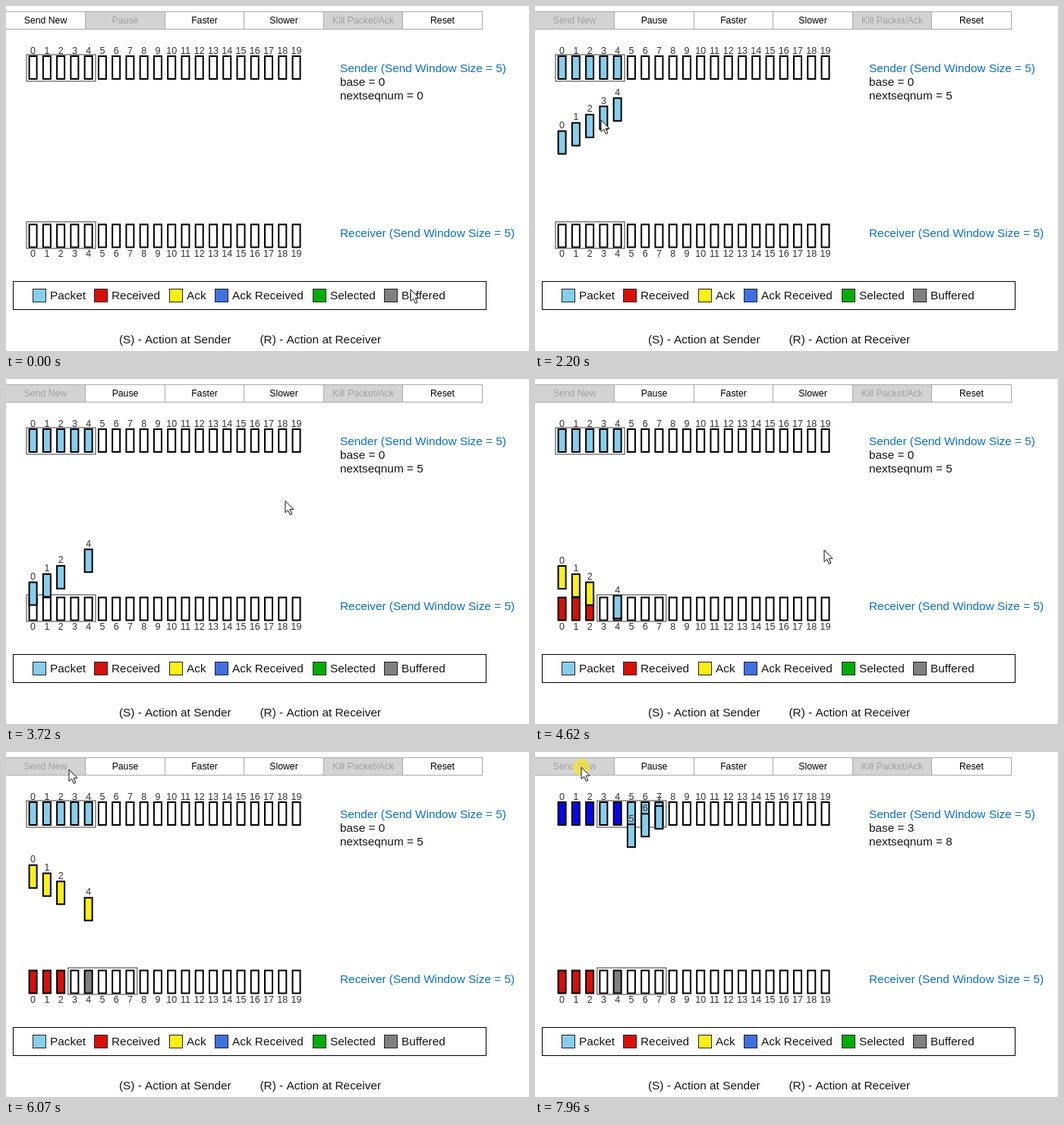
Recreate the animation shown at these times as an HTML page with a canvas. Size 689 by 454 pixels, loop 8 s.

```html
<!DOCTYPE html>
<html lang="en">
<head>
<meta charset="utf-8">
<title>Selective repeat protocol</title>
<style>
  html, body { margin: 0; width: 100%; height: 100%; overflow: hidden; background: #fff; }
  canvas { display: block; }
</style>
</head>
<body>
<canvas id="stage" width="689" height="454"></canvas>
<script>
const ctx = document.getElementById('stage').getContext('2d');
const LOOP = 8000;
const SLOTS = 20, PITCH = 18.26, SENDER_Y = 66, RECEIVER_Y = 287;
const TRAVEL = RECEIVER_Y - SENDER_Y;
const DOWN_SPEED = 0.0677, UP_SPEED = 0.067; // px per ms
const COLOR = {
  packet: '#87ceeb', received: '#d90f08', ack: '#faf014', ackReceived: '#4070e0',
  selected: '#00ad08', buffered: '#808080', acked: '#0606f0', title: '#0a70c4'
};

// Packet 3 is selected and then killed on its way down.
const SELECT_AT = 2300, KILL_AT = 3160, LOST = 3;
const packets = [745, 905, 1065, 1225, 1385, 7530, 7735, 7886].map((sent, id) => {
  const arrives = id === LOST ? Infinity : sent + TRAVEL / DOWN_SPEED;
  return { id, sent, arrives, acked: arrives + TRAVEL / UP_SPEED };
});
const clicks = [...packets.map(p => p.sent), SELECT_AT, KILL_AT];

// Pointer stops: time, x, y
const pointerPath = [
  [40, 533, 373], [430, 59, 18], [1440, 59, 18], [1560, 60, 131], [2200, 87, 150],
  [2340, 87, 152], [2780, 496, 28], [2900, 496, 28], [3100, 490, 19], [3260, 490, 19],
  [3880, 344, 188], [4250, 394, 243], [4560, 381, 225], [4660, 381, 225],
  [5050, 476, 358], [5520, 85, 27], [6000, 83, 23], [6150, 83, 23], [6400, 175, 32],
  [6850, 250, 24], [7200, 250, 24], [7480, 60, 20], [8000, 61, 20]
];

function pointerAt(t) {
  const next = pointerPath.findIndex(stop => stop[0] > t);
  if (next < 1) return pointerPath[0].slice(1);
  const [t0, x0, y0] = pointerPath[next - 1], [t1, x1, y1] = pointerPath[next];
  const u = (t - t0) / (t1 - t0), eased = u * u * (3 - 2 * u);
  return [x0 + (x1 - x0) * eased, y0 + (y1 - y0) * eased];
}

function text(str, x, y, size = 15.36, color = '#151515', align = 'left') {
  ctx.font = `${size}px "Liberation Sans", Arial, sans-serif`;
  ctx.textAlign = align;
  ctx.fillStyle = color;
  ctx.fillText(str, x, y);
}

function box(x, y, w, h, fill, stroke, lineWidth) {
  if (fill) {
    ctx.fillStyle = fill;
    ctx.fillRect(x, y, w, h);
  }
  ctx.strokeStyle = stroke;
  ctx.lineWidth = lineWidth;
  ctx.strokeRect(x, y, w, h);
}

const slotX = id => 35.6 + id * PITCH;
const label = (id, y) => text(id, slotX(id), y, 12.5, '#333', 'center');
const cell = (id, y, fill) => box(slotX(id) - 5, y, 10, 30, fill, '#000', 2);

function movingCell(id, y, fill) {
  cell(id, y, fill);
  label(id, y - 3.5);
}

function drawButtons(t, base, nextSeq) {
  const killable = t >= SELECT_AT && t < KILL_AT;
  const buttons = [
    ['Send New', nextSeq < base + 5], ['Pause', nextSeq > 0], ['Faster', true],
    ['Slower', true], ['Kill Packet/Ack', killable], ['Reset', true]
  ];
  buttons.forEach(([name, enabled], i) => {
    const left = Math.round(i * 104.6 - 0.6) + 0.5, right = Math.round((i + 1) * 104.6 - 0.6) + 0.5;
    box(left, 7.5, right - left, 23, enabled ? '#fff' : '#d3d3d3', '#aaa', 1);
    text(name, (left + right) / 2, 23, 12.25, enabled ? '#000' : '#a0a0a0', 'center');
  });
}

function drawLegend() {
  box(9.5, 362.5, 623, 37, null, '#000', 1);
  [
    [35, 'Packet', 'packet'], [116, 'Received', 'received'], [215, 'Ack', 'ack'],
    [275, 'Ack Received', 'ackReceived'], [404, 'Selected', 'selected'], [498, 'Buffered', 'buffered']
  ].forEach(([x, name, key]) => {
    box(x + 0.5, 372.5, 17, 17, COLOR[key], '#222', 1);
    text(name, x + 23, 386);
  });
  text('(S) - Action at Sender', 149, 444);
  text('(R) - Action at Receiver', 334.5, 444);
}

function drawSlots(t, base, receiverBase) {
  for (let id = 0; id < SLOTS; id++) {
    const p = packets[id];
    let top = '#fff', bottom = '#fff';
    if (p && t >= p.sent) top = t >= p.acked ? COLOR.acked : COLOR.packet;
    if (p && t >= p.arrives) bottom = id < LOST ? COLOR.received : COLOR.buffered;
    cell(id, SENDER_Y, top);
    cell(id, RECEIVER_Y + 0.5, bottom);
    label(id, 63);
    label(id, 330);
  }
  box(27 + base * PITCH, 64, 91, 35, null, '#666', 1.3);
  box(27 + receiverBase * PITCH, 284, 91, 35, null, '#666', 1.3);
}

function drawTraffic(t) {
  for (const p of packets) {
    if (t < p.sent || t >= p.acked || (p.id === LOST && t >= KILL_AT)) continue;
    if (t < p.arrives) {
      const selected = p.id === LOST && t >= SELECT_AT;
      movingCell(p.id, SENDER_Y + (t - p.sent) * DOWN_SPEED, selected ? COLOR.selected : COLOR.packet);
    } else {
      movingCell(p.id, RECEIVER_Y - (t - p.arrives) * UP_SPEED, COLOR.ack);
    }
  }
}

const arrow = new Path2D('M0 0V15.5L3.6 12.2L6.3 18.4L8.8 17.3L6.1 11.2H11Z');

function drawPointer(t) {
  const [x, y] = pointerAt(t);
  if (clicks.some(c => t > c - 40 && t < c + 100)) {
    ctx.fillStyle = 'rgba(246, 228, 40, .72)';
    ctx.beginPath();
    ctx.arc(x, y, 11, 0, 2 * Math.PI);
    ctx.fill();
  }
  ctx.save();
  ctx.translate(x, y);
  ctx.fillStyle = '#fff';
  ctx.fill(arrow);
  ctx.strokeStyle = '#111';
  ctx.lineWidth = 1;
  ctx.stroke(arrow);
  ctx.restore();
}

function draw(t) {
  const nextSeq = packets.filter(p => t >= p.sent).length;
  const inOrder = packets.slice(0, LOST);
  const base = inOrder.filter(p => t >= p.acked).length;
  const receiverBase = inOrder.filter(p => t >= p.arrives).length;

  ctx.fillStyle = '#fff';
  ctx.fillRect(0, 0, 689, 454);
  drawButtons(t, base, nextSeq);
  drawSlots(t, base, receiverBase);
  drawTraffic(t);
  text('Sender (Send Window Size = 5)', 440, 87, 15.36, COLOR.title);
  text(`base = ${base}`, 440, 105);
  text(`nextseqnum = ${nextSeq}`, 440, 123);
  text('Receiver (Send Window Size = 5)', 440, 304, 15.36, COLOR.title);
  drawLegend();
  drawPointer(t);
}

const start = performance.now();
function tick() {
  draw((performance.now() - start) % LOOP);
  requestAnimationFrame(tick);
}
tick();
</script>
</body>
</html>
```
